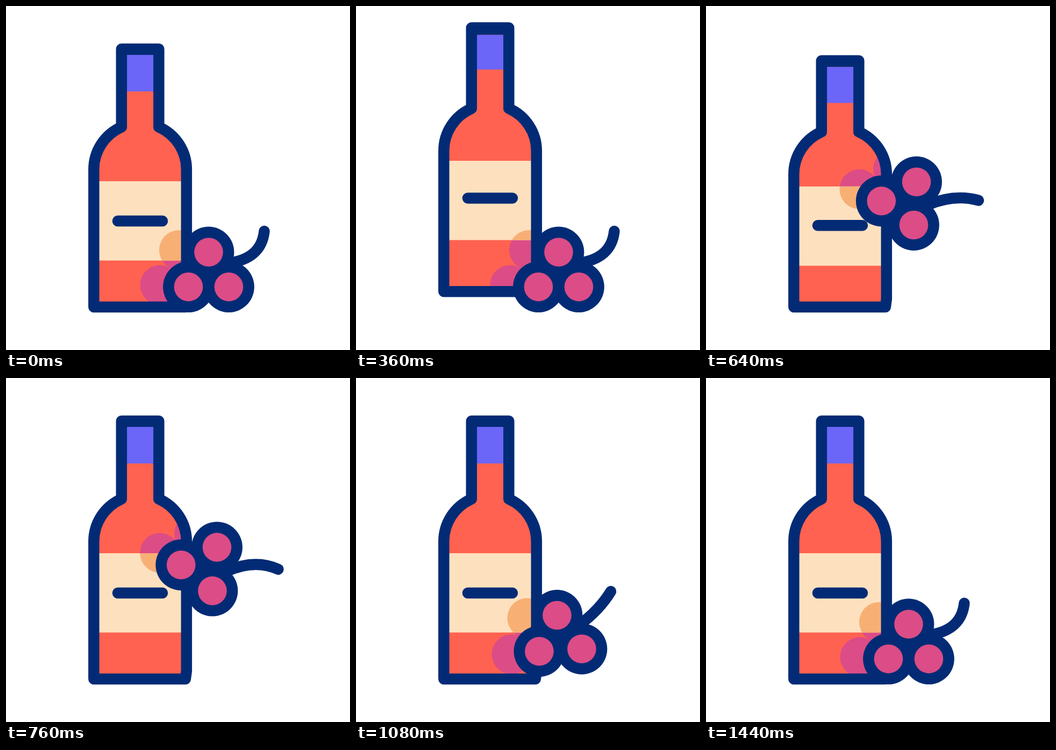
An HTML page with a canvas that plays this animation: 640x640 px, repeating every 1480 ms.

```html
<!DOCTYPE html>
<html lang="en">
<head>
<meta charset="utf-8">
<title>Bottle and grapes</title>
<style>
  html, body { margin: 0; width: 100%; height: 100%; overflow: hidden; background: #fff; }
  canvas { display: block; width: 100vmin; height: 100vmin; }
</style>
</head>
<body>
<canvas width="640" height="640"></canvas>
<script>
const ctx = document.querySelector('canvas').getContext('2d');
const LOOP = 1480, STEP = 40, LINE = 20.5;
const NAVY = '#032b75', RED = '#ff6250', CREAM = '#fde0be',
      PURPLE = '#6b66f8', PINK = '#dc4c86', ORANGE = '#f7af74';

// Vertical shifts: top edge, cap top, cap bottom, shoulders, label, dash, base
const still = [0, 0, 0, 0, 0, 0, 0];
const jump = [-46, -44, -47.5, -38.7, -42.6, -47.2, -31];
const squash = [43.3, 44.5, 42.7, 18.2, 19.6, 16.7, 0];
const bottleKeys = [[0, still], [320, jump], [560, squash], [720, still]];

// x, y, angle | top, left, right grape | stem bend, stem tip | shadow offsets
const rest = [377, 501, 0, 0, -43, -37.5, 21.6, 37.5, 21.6, 98, -31, 103.5, -82, -55, -4, -53, -3.5];
const peak = [366.4, 340.9, 43.4, -5, -45.5, -35, 22.5, 40, 22.5, 60, -77, 110, -87, -41.5, -28, -38.6, -25.3];
const land = [378.7, 504, -8, -2.8, -44.1, -39.7, 22, 42.6, 22, 95, -30, 98.5, -80, -55.5, 13, -50.4, 12.3];
const hop = [378.3, 484.7, -3.3, -1.8, -43.4, -38.6, 21.6, 40.5, 21.7, 77, -48, 100.6, -82, -55.5, 5, -51.5, 5.5];
const sink = rest.map((v, i) => i === 1 ? v + 1.5 : v);
const grapeKeys = [[400, rest], [720, peak], [960, land], [1080, hop], [1160, sink], [1440, rest]];

function pose(keys, t) {
  const next = keys.findIndex(key => key[0] > t);
  if (next === 0) return keys[0][1];
  if (next < 0) return keys[keys.length - 1][1];
  const [t0, from] = keys[next - 1], [t1, to] = keys[next];
  const u = (t - t0) / (t1 - t0), eased = u * u * (3 - 2 * u);
  return from.map((v, i) => v + (to[i] - v) * eased);
}

function disc(x, y, r, color) {
  ctx.beginPath();
  ctx.arc(x, y, r, 0, 2 * Math.PI);
  ctx.fillStyle = color;
  ctx.fill();
}

function box(x, y, w, h, color) {
  ctx.fillStyle = color;
  ctx.fillRect(x, y, w, h);
}

function clipped(path, draw) {
  ctx.save();
  ctx.clip(path);
  draw();
  ctx.restore();
}

function bottlePath(top, shoulder, base) {
  const path = new Path2D(), cx = 249.6, r = 86.25, half = 34.75;
  const neck = Math.asin(half / r), up = -Math.PI / 2;
  path.moveTo(cx + half, 80 + top);
  path.lineTo(cx - half, 80 + top);
  path.arc(cx, 304 + shoulder, r, up - neck, -Math.PI, true);
  path.lineTo(cx - r, 560 + base);
  path.lineTo(333.8, 560 + base);
  path.lineTo(cx + r, 545 + base);
  path.arc(cx, 304 + shoulder, r, 0, up + neck, true);
  path.closePath();
  return path;
}

function drawBottle([top, capTop, capBottom, shoulder, label, dash, base], shadows) {
  const body = bottlePath(top, shoulder, base);
  const labelArea = new Path2D();
  labelArea.rect(164, 326 + label, 171, 147.5);
  const shade = color => shadows.forEach(([x, y]) => disc(x, y, 37, color));

  ctx.fillStyle = RED;
  ctx.fill(body);
  clipped(body, () => {
    shade(PINK);
    box(215, 91 + capTop, 69, 68 + capBottom - capTop, PURPLE);
    ctx.fillStyle = CREAM;
    ctx.fill(labelArea);
    clipped(labelArea, () => shade(ORANGE));
  });

  ctx.stroke(body);
  box(215, 80 + top, 69, 11 + capTop - top, NAVY);
  ctx.beginPath();
  ctx.moveTo(208, 400 + dash);
  ctx.lineTo(291, 400 + dash);
  ctx.stroke();
}

function draw(t) {
  const [x, y, angle, ...p] = pose(grapeKeys, t);
  const cos = Math.cos(angle * Math.PI / 180), sin = Math.sin(angle * Math.PI / 180);
  const place = (px, py) => [x + px * cos - py * sin, y + px * sin + py * cos];
  const grapes = [0, 2, 4].map(i => place(p[i], p[i + 1]));
  const shadows = [0, 1].map(i => [grapes[i][0] + p[10 + 2 * i], grapes[i][1] + p[11 + 2 * i]]);

  box(0, 0, 640, 640, '#fff');
  ctx.strokeStyle = NAVY;
  ctx.lineWidth = LINE;
  ctx.lineCap = ctx.lineJoin = 'round';
  drawBottle(pose(bottleKeys, t), shadows);

  ctx.beginPath();
  ctx.moveTo(...place(38, -23));
  ctx.quadraticCurveTo(...place(p[6], p[7]), ...place(p[8], p[9]));
  ctx.stroke();

  // Navy core closes the gap between the three grapes
  disc(x, y, 20, NAVY);
  grapes.forEach(([gx, gy]) => disc(gx, gy, 47.4, NAVY));
  grapes.forEach(([gx, gy]) => disc(gx, gy, 26.8, PINK));
}

function frame() {
  const t = performance.now() % LOOP;
  draw(Math.floor(t / STEP) * STEP);
  requestAnimationFrame(frame);
}
frame();
</script>
</body>
</html>
```
